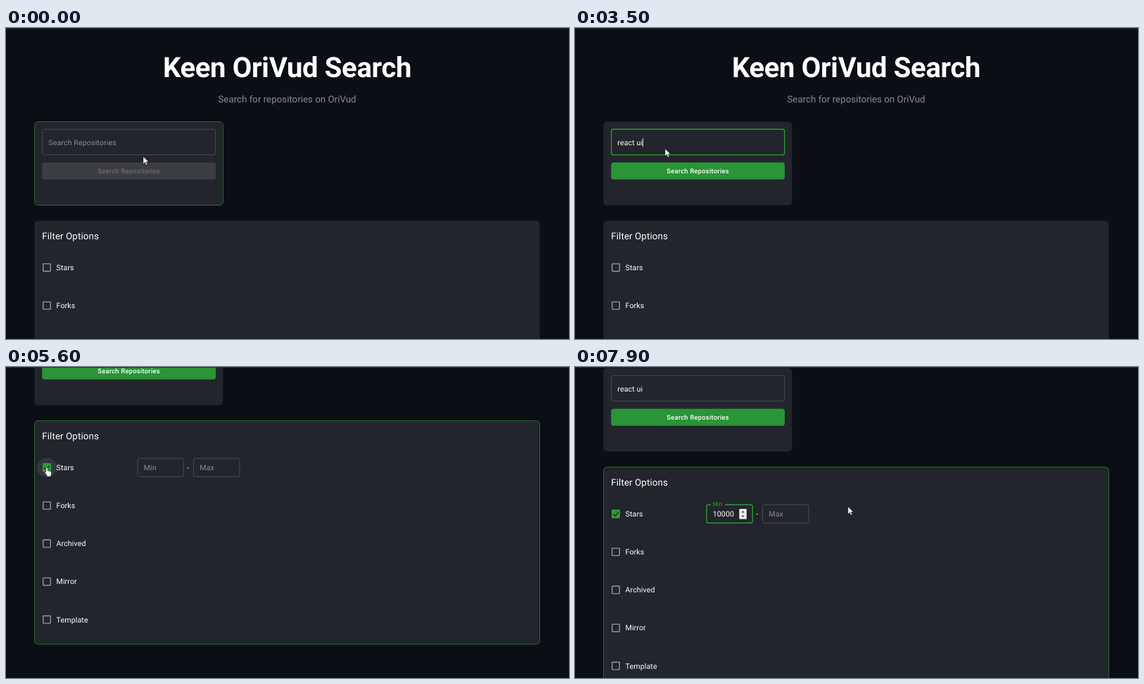
An HTML page that plays this animation: 800 by 443 pixels, repeating every 8000 ms.

```html
<!DOCTYPE html>
<html lang="en">
<head>
<meta charset="utf-8">
<title>Repository search</title>
<style>
  html, body { margin: 0; width: 100%; height: 100%; overflow: hidden; background: #0b0e14; }
  svg { display: block; width: 800px; height: 443px; }
  text { font: 400 10.67px Roboto, sans-serif; letter-spacing: .1px; fill: #fff; text-rendering: geometricPrecision; white-space: pre; }
  .title { font-size: 40px; font-weight: 700; letter-spacing: -.33px; text-anchor: middle; }
  .sub { font-size: 13.33px; letter-spacing: 0; text-anchor: middle; fill: #888b94; }
  .head { font-size: 13.33px; }
  .btn { font-size: 9.33px; font-weight: 500; letter-spacing: .26px; text-anchor: middle; }
  .hint { fill: #8b8d92; }
  .ime text { font: 9.5px "Noto Sans CJK SC", "Noto Sans CJK", "Noto Sans", sans-serif; letter-spacing: 0; }
  .card { fill: #22252b; stroke: #23672e; }
  .line { fill: none; stroke: #484a50; }
</style>
</head>
<body>
<svg viewBox="0 0 800 443">
  <defs>
    <filter id="shadow" x="-10%" y="-50%" width="120%" height="260%">
      <feDropShadow dx="0" dy="4" stdDeviation="5" flood-opacity=".4"/>
    </filter>
  </defs>
  <rect width="800" height="443" fill="#0b0e14"/>
  <g id="page">
    <text class="title" x="399.5" y="70">Keen OriVud Search</text>
    <text class="sub" x="399.5" y="105.5">Search for repositories on OriVud</text>

    <rect id="searchCard" class="card" x="40.5" y="133.5" width="268" height="119" rx="5"/>
    <rect id="field" class="line" x="51.7" y="144.2" width="246" height="36.4" rx="2.7"/>
    <text id="query" x="60.3" y="166.5"></text>
    <rect id="caret" y="157" width=".8" height="12.5" fill="#fff"/>
    <rect id="button" x="51.3" y="191.5" width="246.7" height="24.2" rx="3.5"/>
    <text id="buttonText" class="btn" x="174.6" y="206.8">Search Repositories</text>

    <rect id="filterCard" class="card" x="40.5" y="274.5" width="718" height="318.5" rx="5"/>
    <text class="head" x="51.3" y="300.5">Filter Options</text>
    <g id="rows"></g>

    <circle id="ripple" cx="58" cy="341.2" r="14" fill="#fff"/>
    <g id="check">
      <rect x="52" y="335.2" width="12" height="12" rx="1.4" fill="#2b9a38"/>
      <path d="M54.2 341.4l2.6 2.6 5.2-5.3" fill="none" stroke="#22252b" stroke-width="1.35"/>
    </g>
    <g id="range">
      <rect id="minBox" class="line" x="187" y="328.2" width="65.3" height="26" rx="2.7"/>
      <rect id="notch" x="193" y="327" width="20" height="2.6" fill="#22252b"/>
      <text id="minLabel">Min</text>
      <text id="minValue" x="195.7" y="345.2"></text>
      <rect id="minCaret" y="335" width=".8" height="12.5" fill="#fff"/>
      <g id="spinner">
        <rect x="233.4" y="334.2" width="10.4" height="14.4" fill="#f1f1f1"/>
        <path d="M236.3 339.4l2.3-2.9 2.3 2.9zM236.3 343.4l2.3 2.9 2.3-2.9z" fill="#555"/>
      </g>
      <text x="257.3" y="345">-</text>
      <rect class="line" x="266.5" y="328.2" width="65.5" height="26" rx="2.7"/>
      <text class="hint" x="275.3" y="345.2">Max</text>
    </g>
  </g>

  <g id="ime" class="ime">
    <rect x="60" y="170" width="342" height="22" rx="4" fill="#2c2c2c" filter="url(#shadow)"/>
    <rect x="66" y="172.5" width="39" height="17" rx="2.5" fill="#393939"/>
    <rect x="63.2" y="176" width="2.4" height="10" rx="1.2" fill="#79b8ea"/>
    <g id="candidates"></g>
    <path d="M340.8 178v6l-4.6-3zM351.8 178v6l4.6-3z" fill="#6d6d6d"/>
    <path d="M374 176.5h-3.2q-1.8 0-1.8 1.8v5.6q0 1.8 1.8 1.8h5.8q1.8 0 1.8-1.8v-2.4" fill="none" stroke="#fff"/>
    <path d="M376 181.5l-2.6-2.7q-.8-2.6 1.2-2.9 1 0 1.4.9.5-.9 1.5-.9 2 .5 1.1 2.9z" fill="#fff"/>
    <path d="M389.2 179.2l3.8 3.8 3.8-3.8" fill="none" stroke="#eee" stroke-width="1.2"/>
  </g>

  <rect width="800" height="1" fill="#2b2d33"/>
  <g id="pointer">
    <path id="arrow" d="M0 0V10.6L2.5 8.3 4.1 12 5.9 11.2 4.3 7.6H7.6Z" fill="#fff" stroke="#111" stroke-width=".5"/>
    <path id="hand" d="M-1.2 1Q0-.8 1.2 1V4.8L5.6 5.8Q6.9 6.2 6.7 7.6L5.9 11V13H.2V11.4L-3 7.8Q-3.2 6.2-1.2 7.2Z" fill="#fff" stroke="#111" stroke-width=".5"/>
  </g>
</svg>
<script>
const LOOP = 8000;
const GREEN = "#2c9a38";
const el = Object.fromEntries([...document.querySelectorAll("[id]")].map(n => [n.id, n]));

const set = (node, attrs) => { for (const k in attrs) node.setAttribute(k, attrs[k]); };
const show = (node, on) => node.setAttribute("visibility", on ? "visible" : "hidden");
const ramp = (t, a, b) => Math.min(1, Math.max(0, (t - a) / (b - a)));
const ease = p => p * p * (3 - 2 * p);
const lerp = (a, b, p) => a + (b - a) * p;
const between = (t, a, b) => t >= a && t < b;
const pulse = (t, a, b, fade = 150) => ramp(t, a, a + fade) - ramp(t, b, b + fade);

const mix = (a, b, p) => `rgb(${a.map((v, i) => Math.round(lerp(v, b[i], p)))})`;

// Keys are [time, ...values]; values ease from one key to the next.
function track(t, keys) {
  const i = keys.findIndex(k => k[0] > t);
  if (i === 0) return keys[0].slice(1);
  if (i < 0) return keys[keys.length - 1].slice(1);
  const [a, b] = [keys[i - 1], keys[i]];
  const p = ease(ramp(t, a[0], b[0]));
  return a.slice(1).map((v, n) => lerp(v, b[n + 1], p));
}

const SCROLL = [[4380, 0], [4600, 198], [7640, 198], [7820, 132]];
const POINTER = [
  [100, 195, 183], [700, 128, 172], [3700, 128, 172], [4200, 141, 207], [4400, 141, 207],
  [4590, 222, 227], [4700, 222, 227], [5250, 58, 143], [5600, 58, 143], [6000, 214, 146],
  [6120, 214, 146], [6400, 287, 184], [6800, 292, 184], [7300, 292, 184], [7700, 388, 199]
];
const QUERY_KEYS = [1300, 1500, 2000, 2200, 2400, 2800, 3000, 3200];
const MIN_KEYS = [6450, 6600, 6750, 6950, 7150];

function typed(t, text, keys) {
  const count = keys.filter(k => k <= t).length;
  return { text: text.slice(0, count), last: count ? keys[count - 1] : 0 };
}

function placeCaret(caret, textNode, t, since, on) {
  const width = textNode.textContent ? textNode.getComputedTextLength() : 0;
  caret.setAttribute("x", +textNode.getAttribute("x") + width - .2);
  show(caret, on && (t - since) % 1060 < 530);
}

el.rows.innerHTML = ["Stars", "Forks", "Archived", "Mirror", "Template"].map((name, i) => {
  const y = 341.2 + i * 54.15;
  return `<rect x="52.7" y="${y - 5.3}" width="10.6" height="10.6" rx=".8" fill="none" stroke="#96989c" stroke-width="1.35"/>
    <text x="71.5" y="${y + 3.8}">${name}</text>`;
}).join("");

el.candidates.innerHTML = ["热", "喏", "惹", "若", "熱", "了(le)"].map((word, i) =>
  `<text x="${70.5 + i * 43.5}" y="184.7">${i + 1} ${word}</text>`).join("");

function drawSearch(t) {
  const query = typed(t, "react ui", QUERY_KEYS);
  const focused = between(t, 700, 6050);
  el.query.textContent = query.text || "Search Repositories";
  el.query.setAttribute("class", query.text ? "" : "hint");
  set(el.field, { stroke: focused ? GREEN : "#484a50", "stroke-width": focused ? 1.35 : 1 });
  el.field.style.stroke = focused ? GREEN : "#484a50";
  if (query.text) placeCaret(el.caret, el.query, t, query.last, focused && t < 4300);
  else {
    el.caret.setAttribute("x", 60);
    show(el.caret, focused && (t - 700) % 1060 < 530);
  }
  const active = ramp(t, 1300, 1500);
  el.button.setAttribute("fill", mix([60, 61, 67], [42, 148, 55], active));
  el.buttonText.style.fill = mix([108, 109, 114], [255, 255, 255], active);
  el.searchCard.style.strokeOpacity = 1 - ramp(t, 1000, 1200) + pulse(t, 3850, 4450);
  show(el.ime, between(t, 1400, 1950));
}

function drawFilters(t) {
  const focused = t >= 6050;
  const lift = ease(ramp(t, 6050, 6250));
  const value = typed(t, "10000", MIN_KEYS);
  el.filterCard.style.strokeOpacity = ramp(t, 4480, 4600);
  show(el.check, t >= 5350);
  show(el.range, t >= 5350);
  el.ripple.setAttribute("opacity", .08 * pulse(t, 5200, 5650));
  el.minBox.style.stroke = focused ? GREEN : "#484a50";
  el.minBox.style.strokeWidth = focused ? 1.35 : 1;
  set(el.notch, { x: 203 - 10 * lift, width: 20 * lift });
  set(el.minLabel, { x: 195.7, y: lerp(345.2, 330.2, lift) });
  el.minLabel.style.fontSize = lerp(10.67, 8, lift) + "px";
  el.minLabel.style.fill = focused ? GREEN : "#8b8d92";
  el.minValue.textContent = value.text;
  placeCaret(el.minCaret, el.minValue, t, value.last || 6050, focused);
  show(el.spinner, focused);
}

function draw(t) {
  const [scroll] = track(t, SCROLL);
  const [x, y] = track(t, POINTER);
  const hand = between(t, 4100, 4450) || between(t, 5200, 5680);
  drawSearch(t);
  drawFilters(t);
  el.page.setAttribute("transform", `translate(0 ${-scroll})`);
  el.pointer.setAttribute("transform", `translate(${x} ${y})`);
  show(el.hand, hand);
  show(el.arrow, !hand);
}

const start = performance.now();
function tick() {
  draw((performance.now() - start) % LOOP);
  requestAnimationFrame(tick);
}
tick();
</script>
</body>
</html>
```
